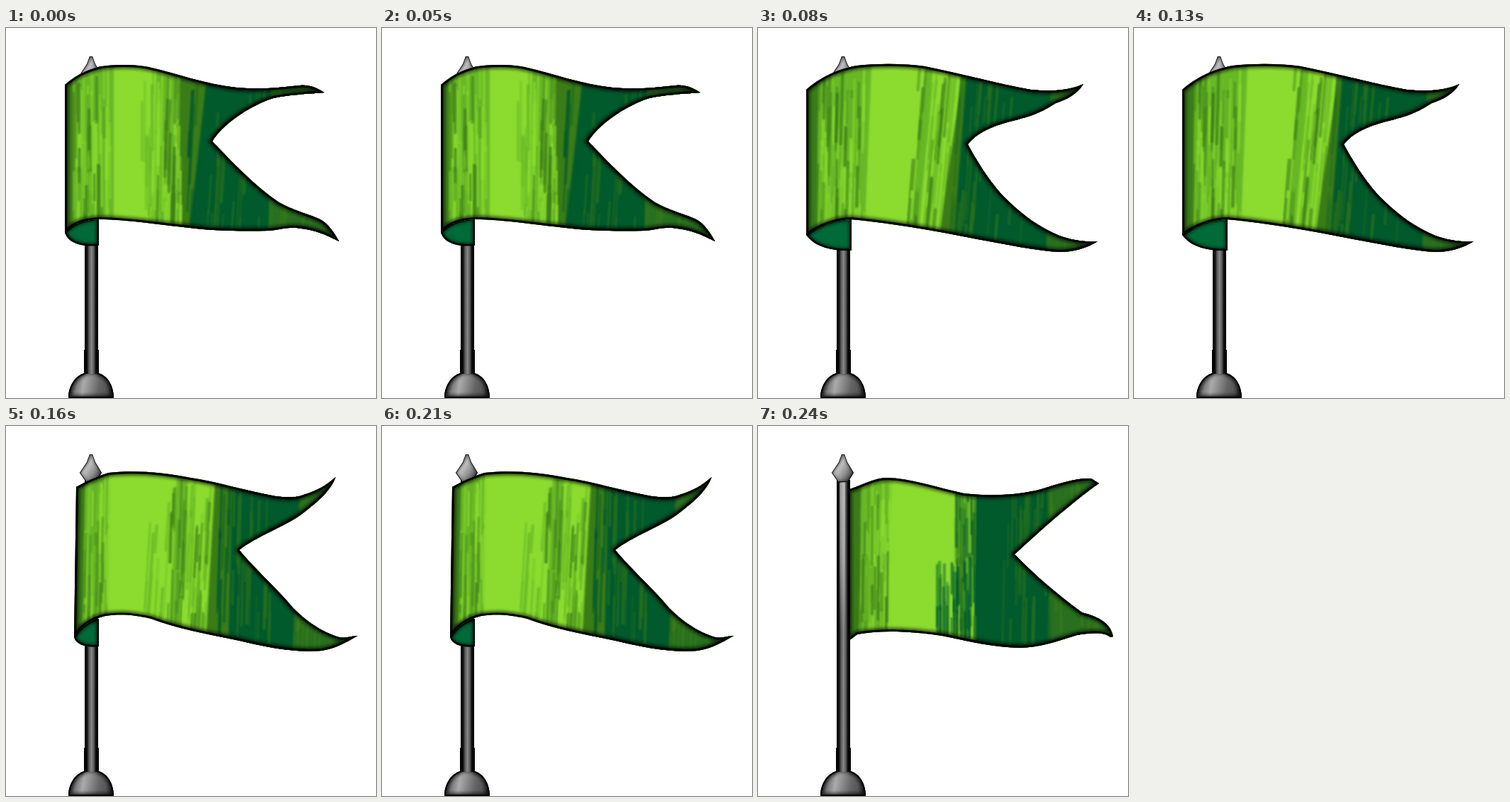
Recreate the animation shown at these times as an HTML page with a canvas. Size 522 by 522 pixels, loop 320 ms.

```html
<!DOCTYPE html>
<html lang="en">
<head>
<meta charset="utf-8">
<title>Waving flag</title>
<style>
html, body { margin: 0; width: 100%; height: 100%; overflow: hidden; background: #fff; }
canvas { display: block; width: 100vmin; height: 100vmin; }
</style>
</head>
<body>
<canvas id="stage" width="522" height="522"></canvas>
<script>
const SIZE = 522, STEP = 80;
const TOP = 55, BOTTOM = 300;
const LIME = '#8bdc2f', LEAF = '#68b826', OLIVE = '#3a7c18', MOSS = '#28701f', DARK = '#005a2c';

// bands: [colour, left edge at TOP, left edge at BOTTOM]
// grain: [colour, left at TOP, left at BOTTOM, width, number of streaks, highest start]
const poses = [
  {
    cloth: 'M83 80C95 70 108 61 130 55C150 51 185 51 205 56C240 64 280 79 325 84C360 87 385 84 415 81C428 80 438 84 449 91C425 93 400 94 377 99C345 109 305 136 291 160C320 190 350 222 385 246C410 260 435 264 448 273C458 281 464 291 470 301C455 294 440 285 410 282C395 281 385 285 370 286C330 287 290 286 260 282C220 278 170 270 131 270C110 271 95 276 83 289Z',
    fold: 'M83 288C95 275 110 270 131 268L131 307C105 309 87 303 83 288Z',
    bands: [[OLIVE, 70, 70], [LEAF, 94, 94], [LIME, 152, 152], [LEAF, 212, 208], [OLIVE, 246, 240], [DARK, 285, 257], [MOSS, 374, 370]],
    grain: [[LIME, 100, 100, 50, 40], [OLIVE, 94, 94, 46, 22], [LEAF, 192, 192, 25, 14], [LIME, 208, 204, 42, 32], [OLIVE, 218, 212, 28, 14],
      [DARK, 264, 250, 20, 10], [MOSS, 290, 275, 85, 26], [OLIVE, 380, 370, 75, 26]]
  },
  {
    cloth: 'M68 87C85 72 110 58 140 53C170 50 205 50 235 54C285 64 340 79 385 87C415 90 440 88 459 79C450 94 435 101 420 106C400 119 385 125 355 132C330 139 310 147 296 164C310 190 330 222 352 243C375 265 395 280 425 293C445 300 462 302 479 301C465 310 445 316 425 316C390 314 350 305 310 298C265 289 190 275 131 270C105 271 82 282 68 293Z',
    fold: 'M68 292C82 280 105 269 132 268L132 314C100 315 79 307 68 292Z',
    bands: [[OLIVE, 50, 50], [LEAF, 86, 82], [LIME, 160, 150], [LEAF, 236, 214], [LIME, 247, 226], [OLIVE, 290, 254], [DARK, 295, 276], [MOSS, 414, 407]],
    grain: [[LIME, 92, 88, 66, 48], [OLIVE, 84, 78, 62, 28], [OLIVE, 227, 208, 18, 12], [LEAF, 240, 216, 44, 26], [OLIVE, 252, 230, 32, 12],
      [MOSS, 288, 270, 45, 22], [MOSS, 300, 280, 105, 18], [OLIVE, 415, 410, 55, 20]]
  },
  {
    cloth: 'M99 86C110 80 125 72 145 66C180 62 220 65 260 73C300 79 340 92 380 99C395 101 412 101 420 97C440 91 453 83 465 72C459 90 440 107 420 122C400 139 350 157 329 175C350 200 375 223 395 245C412 267 440 289 470 298C480 300 487 296 496 296C480 305 465 314 445 317C410 320 370 313 330 303C280 293 240 285 205 272C180 266 160 265 140 268C120 273 105 283 96 299Z',
    fold: 'M96 298C105 282 117 275 131 272L131 311C115 313 99 309 96 298Z',
    bands: [[OLIVE, 80, 80], [LEAF, 112, 108], [LIME, 146, 143], [LEAF, 242, 230], [LIME, 258, 244], [OLIVE, 296, 282], [DARK, 320, 314], [MOSS, 416, 405]],
    grain: [[LIME, 114, 110, 34, 30], [OLIVE, 110, 106, 30, 12], [LEAF, 208, 192, 30, 12], [OLIVE, 232, 225, 24, 16], [LEAF, 254, 240, 42, 26],
      [OLIVE, 262, 248, 30, 10], [DARK, 304, 296, 20, 10], [MOSS, 322, 316, 64, 22], [OLIVE, 418, 408, 55, 24]]
  },
  {
    cloth: 'M127 90C145 84 165 73 182 73C215 74 250 86 290 95C330 100 370 97 400 89C425 81 450 73 470 74L481 81C445 106 400 146 362 181C390 210 425 240 457 263C475 268 497 275 501 297L497 298C488 290 470 292 450 295C420 304 400 312 370 313C330 312 300 304 260 296C220 290 175 287 140 294L127 304Z',
    bands: [[OLIVE, 110, 110], [LEAF, 146, 142], [LIME, 190, 178], [LEAF, 278, 278], [DARK, 308, 304], [MOSS, 408, 412]],
    grain: [[LIME, 150, 145, 44, 32], [OLIVE, 140, 138, 46, 18], [LIME, 276, 276, 28, 16, 160], [DARK, 278, 278, 30, 34],
      [DARK, 252, 252, 30, 18, 180], [OLIVE, 278, 278, 30, 10], [MOSS, 350, 345, 65, 30], [OLIVE, 410, 415, 65, 26]]
  }
];

function makeRandom(seed) {
  return () => (seed = (seed * 16807) % 2147483647) / 2147483647;
}

function gradient(c, box, colours) {
  const g = c.createLinearGradient(...box);
  colours.forEach((colour, i) => g.addColorStop(i / (colours.length - 1), colour));
  return g;
}

// Paints inside the path, then a soft dark rim and a black line along its inner side.
function drawInside(c, path, paint, rim, line) {
  c.save();
  c.clip(path);
  paint();
  c.strokeStyle = '#000';
  c.globalAlpha = .6;
  c.filter = 'blur(2px)';
  c.lineWidth = rim;
  c.stroke(path);
  c.globalAlpha = 1;
  c.filter = 'none';
  c.lineWidth = line;
  c.stroke(path);
  c.restore();
}

function fillInside(c, path, fill, rim, line) {
  drawInside(c, new Path2D(path), () => {
    c.fillStyle = fill;
    c.fillRect(0, 0, SIZE, SIZE);
  }, rim, line);
}

function drawPole(c) {
  const dome = gradient(c, [88, 500, 152, 512], ['#333', '#777', '#aaa', '#888', '#666', '#555', '#222']);
  fillInside(c, 'M88 522C88 508 95 492 110 487L112 484H129L131 487C146 492 152 508 152 522Z', dome, 9, 4);

  c.fillStyle = '#000';
  c.fillRect(110, 454, 21, 32);
  c.fillStyle = gradient(c, [111, 0, 130, 0], ['#000', '#0a0a0a', '#5c5c5c', '#858585', '#606060', '#0a0a0a', '#000']);
  c.fillRect(111, 76, 19, 412);
  c.fillStyle = gradient(c, [0, 80, 0, 290], ['#ffffff70', '#ffffff50', '#ffffff00']);
  c.fillRect(115, 80, 8, 210);

  const steel = gradient(c, [106, 50, 134, 70], ['#888', '#c4c4c4', '#909090', '#444']);
  fillInside(c, 'M118 40H122L126 51L135 66L127 79H113L104 66L114 51Z', steel, 3, 1.5);
}

const edgeAt = (top, bottom, y) => top + (bottom - top) * (y - TOP) / (BOTTOM - TOP);

function paintBands(c, bands) {
  c.filter = 'blur(1.5px)';
  for (const [colour, top, bottom] of bands) {
    c.fillStyle = colour;
    c.beginPath();
    c.moveTo(edgeAt(top, bottom, 0), 0);
    c.lineTo(SIZE, 0);
    c.lineTo(SIZE, SIZE);
    c.lineTo(edgeAt(top, bottom, SIZE), SIZE);
    c.fill();
  }
}

function paintGrain(c, grain, random) {
  c.filter = 'blur(1.2px)';
  c.lineCap = 'round';
  for (const [colour, top, bottom, width, count, highest = 50] of grain) {
    c.strokeStyle = colour;
    for (let i = 0; i < count; i++) {
      const shift = random() * width;
      const y = highest + random() * (280 - highest);
      const end = y + 35 + random() * 90;
      c.globalAlpha = .35 + random() * .45;
      c.lineWidth = 2 + random() * 2.5;
      c.beginPath();
      c.moveTo(edgeAt(top, bottom, y) + shift, y);
      c.lineTo(edgeAt(top, bottom, end) + shift, end);
      c.stroke();
    }
  }
}

function render(pose, index) {
  const layer = document.createElement('canvas');
  layer.width = layer.height = SIZE;
  const c = layer.getContext('2d');
  c.lineJoin = 'round';
  c.fillStyle = '#fff';
  c.fillRect(0, 0, SIZE, SIZE);
  drawPole(c);
  if (pose.fold) fillInside(c, pose.fold, '#006a38', 8, 5);
  drawInside(c, new Path2D(pose.cloth), () => {
    paintBands(c, pose.bands);
    paintGrain(c, pose.grain, makeRandom(1234 + index * 97));
  }, 11, 6);
  return layer;
}

const layers = poses.map(render);
const stage = document.getElementById('stage').getContext('2d');
const start = performance.now();

function tick() {
  const elapsed = performance.now() - start;
  stage.drawImage(layers[Math.floor(elapsed / STEP) % layers.length], 0, 0);
  requestAnimationFrame(tick);
}
tick();
</script>
</body>
</html>
```
